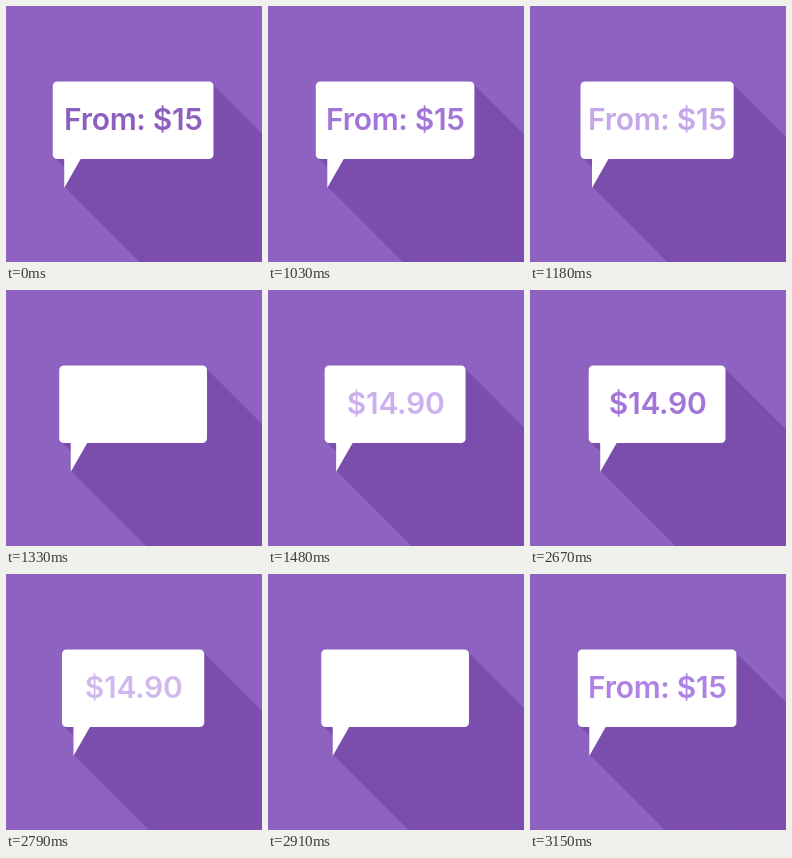
Write an HTML page that moves like this. It is 256 px wide and 256 px high and loops after 3.21 s.

```html
<!DOCTYPE html>
<html lang="en">
<head>
<meta charset="utf-8">
<title>Price bubble</title>
<style>
  @property --p {
    syntax: "<number>";
    inherits: true;
    initial-value: 0;
  }
  html, body {
    margin: 0;
    width: 100%;
    height: 100%;
    overflow: hidden;
    background: #8e62c0;
  }
  svg {
    display: block;
    width: 100%;
    height: 100%;
    animation: squeeze 3210ms step-end infinite;
  }
  .left { transform: translateX(calc(13px * var(--p))); }
  .right { transform: translateX(calc(-13px * var(--p))); }
  .shade { fill: #7b4eae; }
  .body {
    fill: #fff;
    filter: drop-shadow(0.2px 0.6px 0.6px rgba(60, 30, 100, .4));
  }
  rect {
    x: calc(46.7px + 13px * var(--p));
    width: calc(160.8px - 26px * var(--p));
  }
  text {
    font: 600 30px Inter, Roboto, sans-serif;
    letter-spacing: -.3px;
    text-anchor: middle;
    fill: #8d60c0;
  }
  .from { animation: from 3210ms step-end infinite; }
  .price { animation: price 3210ms step-end infinite; }

  /* 0 = wide bubble, 1 = narrow bubble */
  @keyframes squeeze {
    0% { --p: 0; }
    32.08% { --p: .08; }
    33.02% { --p: .08; animation-timing-function: steps(5); }
    37.69% { --p: .3425; }
    38.62% { --p: .3425; animation-timing-function: steps(11); }
    48.9% { --p: .92; }
    49.84% { --p: 1; }
    83.17% { --p: .92; animation-timing-function: steps(16); }
    98.13% { --p: .08; }
    100% { --p: 0; }
  }
  @keyframes from {
    0% { opacity: 1; fill: #8d60c0; }
    32.08% { opacity: .9; fill: #9866d4; }
    33.02% { opacity: .9; fill: #9866d4; animation-timing-function: steps(8); }
    41.43% { opacity: 0; fill: #9c64e0; }
    90.65% { opacity: 0; fill: #9c64e0; animation-timing-function: steps(8); }
    98.13% { opacity: .8; fill: #9c64e0; }
    100% { opacity: 1; fill: #8d60c0; }
  }
  @keyframes price {
    0% { opacity: 0; fill: #9c64e0; }
    41.43% { opacity: 0; fill: #9c64e0; animation-timing-function: steps(8); }
    48.9% { opacity: .8; fill: #9c64e0; }
    49.84% { opacity: 1; fill: #8d60c0; }
    83.17% { opacity: .9; fill: #9866d4; animation-timing-function: steps(8); }
    90.65% { opacity: 0; fill: #9c64e0; }
    100% { opacity: 0; fill: #9c64e0; }
  }
</style>
</head>
<body>
<svg viewBox="0 0 256 256">
  <g class="shade">
    <path class="left" d="M48.2 151.5L58.5 161.8V180.8L358.5 480.8V300L127 100Z"/>
    <path class="right" d="M206.5 78L506.5 378H300L120 150V78Z"/>
  </g>
  <g class="body">
    <rect y="75.5" height="77.5" rx="4.5"/>
    <path class="left" d="M58.2 150V182L74.7 153V150Z"/>
  </g>
  <text class="from" x="127.3" y="124">From: $15</text>
  <text class="price" x="127.6" y="124">$14.90</text>
</svg>
</body>
</html>
```
